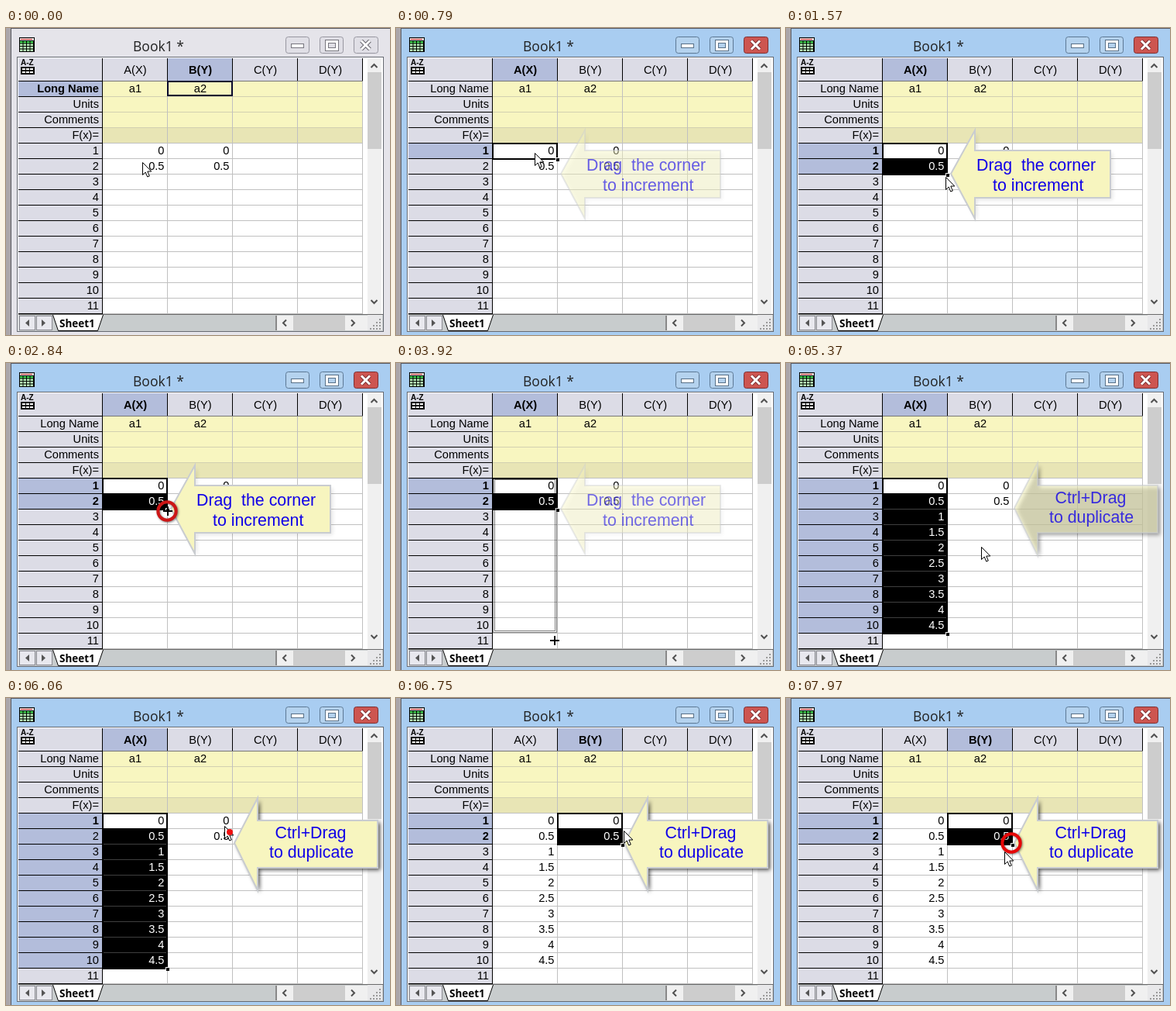
Animation, 496 px wide and 396 px high, one loop 8 s. Source, as an HTML page with a canvas:

```html
<!DOCTYPE html>
<html lang="en">
<head>
<meta charset="utf-8">
<title>Worksheet autofill</title>
<style>
html, body { margin: 0; width: 100%; height: 100%; overflow: hidden; }
canvas { display: block; }
</style>
</head>
<body>
<canvas id="stage" width="496" height="396"></canvas>
<script>
const ctx = document.getElementById('stage').getContext('2d');
const LOOP = 8000;
const ARIAL = '"Liberation Sans", Arial, sans-serif';
const UI = '"Open Sans", "Noto Sans", sans-serif';
const HEAD = '#dcdce6', HILITE = '#b3bddb', BLACK = '#000';
const LEFT = 125, COL = 84, TOP = 148, ROW = 20;
const COLUMNS = ['A(X)', 'B(Y)', 'C(Y)', 'D(Y)'];
const LABELS = ['Long Name', 'Units', 'Comments', 'F(x)='];

const clamp = v => Math.max(0, Math.min(1, v));
const ramp = (t, a, b) => clamp((t - a) / (b - a));

function rect(x, y, w, h, color) {
  ctx.fillStyle = color;
  ctx.fillRect(x, y, w, h);
}

function frame(x, y, w, h, color, width = 1) {
  ctx.strokeStyle = color;
  ctx.lineWidth = width;
  ctx.strokeRect(x, y, w, h);
}

function text(str, x, y, { align = 'left', color = BLACK, size = 14.67, bold = false, face = ARIAL } = {}) {
  ctx.font = `${bold ? 'bold ' : ''}${size}px ${face}`;
  ctx.textAlign = align;
  ctx.fillStyle = color;
  ctx.fillText(str, x, y);
}

function path(points, close = false) {
  ctx.beginPath();
  points.forEach(([x, y]) => ctx.lineTo(x, y));
  if (close) ctx.closePath();
}

function line(points, color, width = 1) {
  path(points);
  ctx.strokeStyle = color;
  ctx.lineWidth = width;
  ctx.stroke();
}

function polygon(points, color) {
  path(points, true);
  ctx.fillStyle = color;
  ctx.fill();
}

// Position on a list of [time, x, y] stops
function along(stops, t) {
  if (t <= stops[0][0]) return stops[0].slice(1);
  for (let i = 1; i < stops.length; i++) {
    const [t0, x0, y0] = stops[i - 1], [t1, x1, y1] = stops[i];
    if (t < t1) {
      const k = ramp(t, t0, t1);
      return [x0 + (x1 - x0) * k, y0 + (y1 - y0) * k];
    }
  }
  return stops[stops.length - 1].slice(1);
}

function button(x, w, fill, border) {
  ctx.beginPath();
  ctx.roundRect(x + 0.5, 11.5, w, 21, 3);
  ctx.fillStyle = fill;
  ctx.fill();
  ctx.strokeStyle = border;
  ctx.lineWidth = 1;
  ctx.stroke();
}

function drawWindow(active) {
  rect(0, 0, 496, 396, '#aaa6aa');
  rect(6, 0, 490, 396, active ? '#a9cdf1' : '#e5e4ea');
  rect(6, 0, 1, 396, '#56565e');
  rect(6, 0, 490, 1, '#56565e');

  // Book icon
  rect(17, 12, 20, 19, BLACK);
  rect(18, 13, 18, 3, '#e8e8e8');
  rect(19, 14, 15, 1, '#d03030');
  for (let y = 0; y < 4; y++)
    for (let x = 0; x < 4; x++) rect(18 + x * 4.5, 17 + y * 3.5, 3.5, 2.5, y ? '#b8f0b8' : '#40d050');

  text('Book1 *', 164, 30, { size: 17.5, face: UI, color: '#222' });

  const face = active ? '#b4d2ee' : '#e0dfe6', edge = active ? '#5c7894' : '#9796a0';
  button(361, 30, face, edge);
  button(405, 30, face, edge);
  button(449, 31, active ? '#cd5550' : face, active ? '#7c3032' : edge);
  const ink = active ? '#587088' : '#77767e';
  rect(368, 20, 17, 6, ink);
  rect(369, 21, 15, 4, '#fff');
  frame(414.5, 17.5, 13, 10, ink, 5);
  frame(414.5, 17.5, 13, 10, '#fff', 3);
  for (const [color, width] of [[active ? '#7c3032' : '#66656c', 5], ['#fff', 3]]) {
    line([[459, 16.5], [470, 27.5]], color, width);
    line([[470, 16.5], [459, 27.5]], color, width);
  }
  rect(14, 37, 474, 355, '#666a72');
  rect(15, 38, 472, 353, '#fff');
}

function chevron(x, y, dx, dy) {
  line([[x - 4 * dy - 2 * dx, y - 4 * dx - 2 * dy], [x + 2 * dx, y + 2 * dy],
        [x + 4 * dy - 2 * dx, y + 4 * dx - 2 * dy]], '#505050', 2);
}

function drawBars() {
  rect(467, 39, 18, 331, '#f0f0f0');
  rect(467, 57, 18, 99, '#cdcdcd');
  chevron(475.5, 49, 0, -1);
  chevron(475.5, 353, 0, 1);

  rect(16, 370, 471, 21, '#c8cccd');
  rect(16, 369, 471, 1, '#6a6a6a');
  for (const x of [17, 39]) {
    rect(x, 371, 20, 19, '#e8e8ee');
    frame(x + 0.5, 371.5, 20, 18, '#8c8c94');
  }
  polygon([[30, 376], [30, 385], [25, 380.5]], '#555');
  polygon([[46, 376], [46, 385], [51, 380.5]], '#555');
  const tab = [[60.5, 370], [67.5, 390.5], [118.5, 390.5], [125.5, 370]];
  polygon(tab, '#fff');
  line(tab, BLACK);
  text('Sheet1', 69, 386, { size: 13.5, bold: true, face: UI });

  rect(349, 371, 118, 19, '#f0f0f0');
  rect(348, 371, 2, 19, '#888');
  rect(371, 371, 67, 19, '#cdcdcd');
  chevron(360, 380.5, -1, 0);
  chevron(448, 380.5, 1, 0);
  rect(467, 370, 19, 20, '#e8e8ea');
  for (let i = 0; i < 4; i++)
    for (let j = 0; j <= i; j++) rect(482 - j * 4, 375 + i * 4, 2, 2, '#999');
}

function drawCorner() {
  text('A-Z', 19, 48, { size: 10, bold: true });
  rect(19, 50, 18, 10, BLACK);
  for (let y = 0; y < 2; y++)
    for (let x = 0; x < 3; x++) rect(21 + x * 5, 52 + y * 4, 4, 2, '#fff');
}

function drawSheet(sel, filled) {
  rect(16, 39, 109, 329, HEAD);
  drawCorner();

  COLUMNS.forEach((name, c) => {
    const x = LEFT + c * COL, on = c === sel.col;
    rect(x, 39, COL, 29, on ? HILITE : HEAD);
    text(name, x + 42, 59, { align: 'center', bold: on });
    rect(x - 1, 39, 1, 30, BLACK);
  });
  rect(460, 39, 1, 30, BLACK);

  rect(LEFT, 69, 336, 60, '#f8f6c0');
  rect(LEFT, 129, 336, 19, '#e8e5b5');

  for (let r = 0; r < 15; r++) {
    const y = 68 + r * ROW, n = r - 3;
    const on = sel.label ? r === 0 : n >= 1 && n <= sel.rows;
    const bold = sel.label ? on : on && n <= sel.bold;
    if (on) rect(16, y, 108, ROW, HILITE);
    text(r < 4 ? LABELS[r] : String(n), 120, y + 15, { align: 'right', bold });
    rect(16, y, 109, 1, BLACK);
    rect(LEFT, y, 336, 1, r < 4 ? '#d2d0b0' : '#c0c0c0');
  }
  rect(16, 368, 109, 1, BLACK);
  rect(LEFT, 368, 336, 1, '#c0c0c0');
  rect(LEFT, 68, 336, 1, '#777');
  for (let c = 1; c < 5; c++) rect(LEFT - 1 + c * COL, 69, 1, 300, '#c0c0c0');
  rect(124, 39, 1, 330, BLACK);

  text('a1', 167, 83, { align: 'center' });
  text('a2', 251, 83, { align: 'center' });

  const x0 = LEFT + sel.col * COL;
  if (!sel.label && sel.rows > 1) {
    rect(x0, TOP + ROW, COL, (sel.rows - 1) * ROW, BLACK);
    for (let r = 2; r < sel.rows; r++) rect(x0, TOP + r * ROW, COL, 1, '#3f3f3f');
  }
  for (let c = 0; c < 2; c++)
    for (let r = 0; r < (c || !filled ? 2 : 10); r++) {
      const inverse = !sel.label && c === sel.col && r > 0 && r < sel.rows;
      text(String(r / 2), LEFT + c * COL + 79.5, TOP + r * ROW + 15,
        { align: 'right', color: inverse ? '#fff' : BLACK });
    }

  if (sel.label) {
    frame(x0, 69, COL - 1, 18, '#08082e', 2);
  } else {
    const h = sel.rows * ROW;
    frame(x0, TOP + 1, COL - 1, h, BLACK, 2);
    rect(x0 + COL - 3, TOP + h - 1, 5, 5, '#fff');
    rect(x0 + COL - 2, TOP + h, 4, 4, BLACK);
  }
}

function selectionAt(t) {
  if (t < 400) return { col: 1, label: true };
  if (t < 1120) return { col: 0, rows: 1, bold: 1 };
  if (t < 4400) return { col: 0, rows: 2, bold: 2 };
  if (t < 6120) return { col: 0, rows: 10, bold: 1 };
  if (t < 6450) return { col: 1, rows: 1, bold: 1 };
  return { col: 1, rows: 2, bold: 2 };
}

function callout(points, lines, alpha, shadow) {
  if (alpha <= 0) return;
  ctx.save();
  ctx.globalAlpha = alpha;
  ctx.shadowColor = `rgba(0,0,0,${shadow})`;
  ctx.shadowBlur = 5;
  ctx.shadowOffsetX = ctx.shadowOffsetY = 3;
  polygon(points, '#f7f5bf');
  ctx.shadowColor = 'transparent';
  path(points, true);
  ctx.strokeStyle = '#c9ccd0';
  ctx.lineWidth = 2;
  ctx.stroke();
  ctx.globalAlpha = Math.min(1, alpha * 1.4);
  for (const [str, x, y] of lines) text(str, x, y, { size: 21.33, color: '#1000e8' });
  ctx.restore();
}

// Left-pointing block arrow
const arrowShape = (tip, neck, right, top, bottom, midY) =>
  [[tip, midY], [neck, top], [neck, 158], [right, 158], [right, 219], [neck, 219], [neck, bottom]];

const DRAG_SHAPE = arrowShape(213, 244, 419, 132, 246, 188);
const COPY_SHAPE = arrowShape(295, 325, 480, 129, 248, 187);

function ring(x, y, color, alpha) {
  if (alpha <= 0) return;
  ctx.save();
  ctx.globalAlpha = alpha;
  ctx.shadowColor = 'rgba(0,0,0,0.5)';
  ctx.shadowBlur = 3;
  ctx.shadowOffsetX = ctx.shadowOffsetY = 1;
  ctx.beginPath();
  ctx.arc(x, y, 11.7, 0, 7);
  ctx.strokeStyle = color;
  ctx.lineWidth = 4;
  ctx.stroke();
  ctx.restore();
}

function pointer([x, y]) {
  ctx.save();
  ctx.translate(Math.round(x) + 0.5, Math.round(y) + 0.5);
  path([[0, 0], [0, 16], [3.7, 12.5], [6.2, 18.5], [8.8, 17.5], [6.3, 11.5], [11.3, 11.5]], true);
  ctx.fillStyle = '#fff';
  ctx.fill();
  ctx.strokeStyle = BLACK;
  ctx.lineWidth = 1;
  ctx.stroke();
  ctx.restore();
}

function cross([x, y]) {
  x = Math.round(x);
  y = Math.round(y);
  rect(x - 6, y - 1, 12, 2, BLACK);
  rect(x - 1, y - 6, 2, 12, BLACK);
}

const ARROW_PATH = [
  [130, 176, 173], [400, 179, 161], [940, 179, 161], [1200, 182, 178], [1720, 215, 198],
  [1750, 215, 198], [2340, 204, 188], [4890, 205, 353], [5670, 282, 165], [6090, 282, 165],
  [6450, 284, 176], [6840, 297, 169], [6930, 283, 170], [7660, 283, 170], [7960, 282, 198]
];
const CROSS_PATH = [[2900, 209, 191], [3380, 206, 292], [3694, 205, 358]];

function draw(t) {
  drawWindow(t >= 400);
  drawBars();
  drawSheet(selectionAt(t), t >= 4400);

  const crossing = t >= 2600 && t < 4900;
  const plus = along(CROSS_PATH, t);
  if (t >= 2900 && t < 4400) {
    const rows = Math.max(2, Math.floor((plus[1] - TOP) / ROW));
    ctx.setLineDash([1, 1]);
    frame(LEFT + 0.5, TOP + 0.5, COL - 2, rows * ROW - 1, BLACK);
    frame(LEFT + 2.5, TOP + 2.5, COL - 6, rows * ROW - 5, BLACK);
    ctx.setLineDash([]);
  }

  callout(DRAG_SHAPE, [['Drag  the corner', 246, 184], ['to increment', 267, 210]],
    ramp(t, 400, 1280) * (1 - ramp(t, 3400, 4280)), 0.1);
  callout(COPY_SHAPE, [['Ctrl+Drag', 347.5, 181], ['to duplicate', 340, 206]],
    ramp(t, 4850, 5760), 0.65);

  ring(208, 191, '#cc1616', ramp(t, 1750, 2050) * (1 - ramp(t, 2900, 3200)));
  ring(291, 187, '#e60808', ramp(t, 7650, 7950));

  if (crossing) {
    cross(plus);
  } else {
    const at = along(ARROW_PATH, t);
    pointer(at);
    const pressed = (t >= 390 && t < 520) || (t >= 6060 && t < 6300);
    if (pressed) {
      ctx.beginPath();
      ctx.arc(at[0] + 7, at[1] + 8, 4, 0, 7);
      ctx.fillStyle = '#f01010';
      ctx.fill();
    }
  }
}

function tick() {
  draw(performance.now() % LOOP);
  requestAnimationFrame(tick);
}
tick();
</script>
</body>
</html>
```
